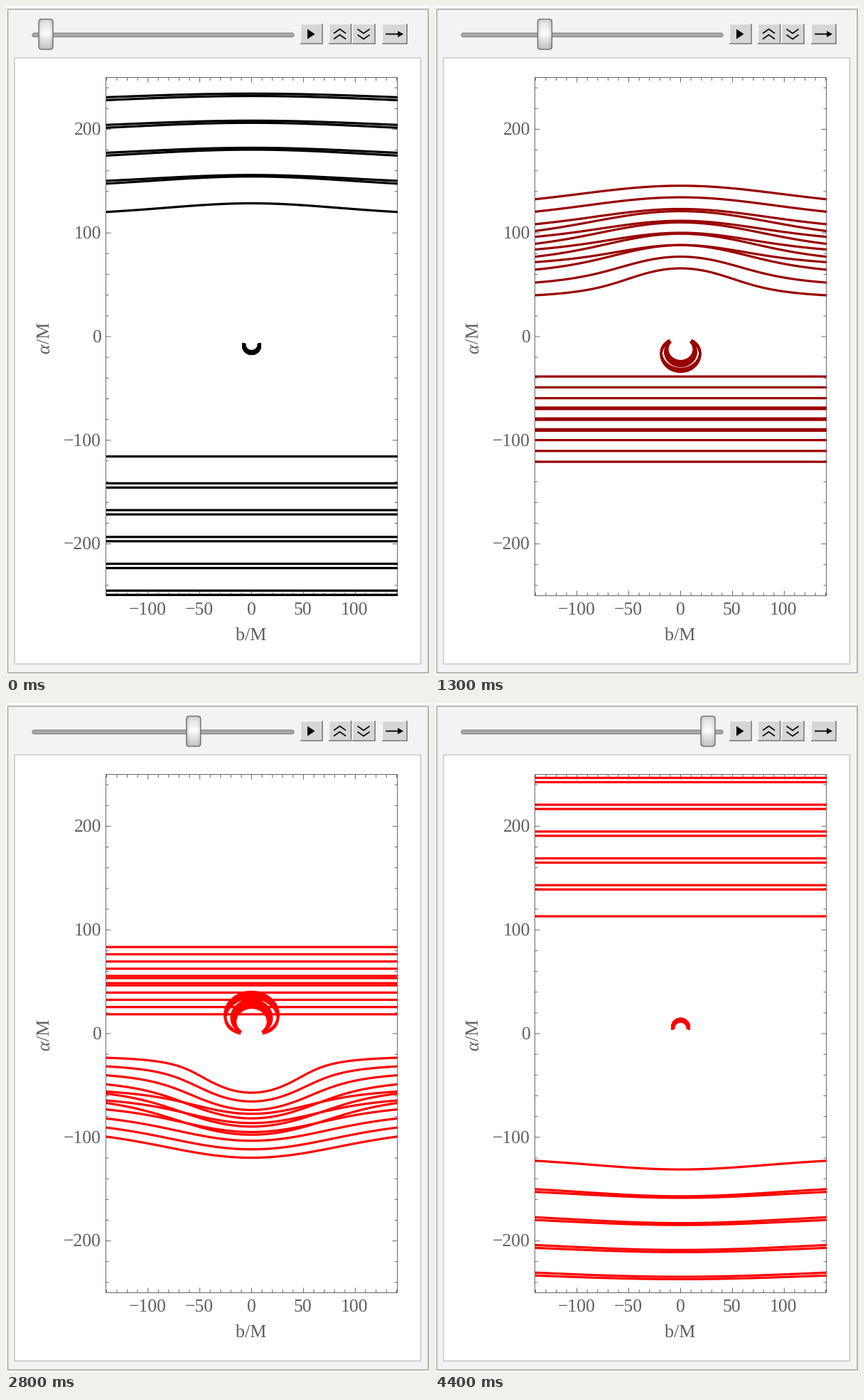
Recreate the animation shown at these times as a matplotlib script. Size 595 by 941 pixels, loop 4.5 s.

```python
import numpy as np
import matplotlib.pyplot as plt
from matplotlib.animation import FuncAnimation
from matplotlib.collections import LineCollection
from matplotlib.patches import FancyBboxPatch, Polygon, Rectangle

plt.rcParams["path.snap"] = False
plt.rcParams["text.hinting"] = "none"

W, H, DPI = 595, 941, 100
PT = 72 / DPI                      # points per pixel
SCALE, CX, CY = 1.458, 345.5, 465  # plot units to pixels
SHIFT = -1.25                      # small vertical offset of the picture
GRAY, INK = "#666666", "#606060"

fig = plt.figure(figsize=(W / DPI, H / DPI), dpi=DPI, facecolor="white")
ax = fig.add_axes([0, 0, 1, 1])
ax.axis("off")


def px(x, y):
    return CX + SCALE * x, CY - SCALE * y


def box(x0, y0, x1, y1, fc="none", ec="none", lw=1.0, z=1):
    ax.add_patch(Rectangle((x0, y0), x1 - x0, y1 - y0, fc=fc, ec=ec,
                           lw=lw * PT, zorder=z))


def stroke(xs, ys, color, lw=1.0, z=2):
    ax.plot(xs, ys, color=color, lw=lw * PT, zorder=z,
            solid_capstyle="butt", solid_joinstyle="miter")


def rounded(x0, y0, x1, y1, r, **style):
    patch = FancyBboxPatch((x0, y0), x1 - x0, y1 - y0,
                           boxstyle=f"round,pad=0,rounding_size={r}", **style)
    return ax.add_patch(patch)


def label(x, y, s, ha="center", rot=0, style="normal", size=25.6):
    ax.text(x, y, s, ha=ha, va="baseline", rotation=rot,
            rotation_mode="anchor", color=INK, family="Liberation Serif",
            style=style, fontsize=size * PT)


def button(x0, x1):
    box(x0, 25, x1, 53.5, fc="#d6d6d6")
    stroke([x0 + 0.5, x0 + 0.5, x1], [53, 25.5, 25.5], "#f8f8f8", 1.2)
    stroke([x0, x1 - 0.5, x1 - 0.5], [53, 53, 25], "#777777", 1.5)


def draw_panel():
    box(2.5, 4.5, 594, 938, fc="#f3f3f3", ec="#a6a6a6", lw=1.6)
    box(12, 73, 583.5, 925.5, fc="white", ec="#bdbdbd", lw=1.2)
    rounded(37, 38, 405, 43.5, 2.7, fc="#a8a8a8", ec="#7c7c7c",
            lw=PT, zorder=2)
    for x0, x1 in ((414, 445.5), (454, 486), (487, 519.5), (529, 564.5)):
        button(x0, x1)
    ax.add_patch(Polygon([(424, 32.5), (434.5, 39.5), (424, 46.5)],
                         fc="black", ec="none", zorder=3))
    for dy in (0, 8):
        stroke([461, 469.5, 478], [38.5 + dy, 32.5 + dy, 38.5 + dy],
               "black", 1.7, 3)
        stroke([494.5, 503, 511.5], [32.5 + dy, 38.5 + dy, 32.5 + dy],
               "black", 1.7, 3)
    stroke([534, 556], [39.5, 39.5], "black", 1.8, 3)
    ax.add_patch(Polygon([(551, 35), (559, 39.5), (551, 44)],
                         fc="black", ec="none", zorder=3))


def draw_axes():
    x0, x1, y0, y1 = 140.5, 550.5, 100.5, 829.5
    box(x0, y0, x1, y1, ec=GRAY, z=2)
    for v in range(-140, 141, 10):
        n = 7 if v % 50 == 0 else 4.5
        x = px(v, 0)[0]
        stroke([x, x], [y0, y0 + n], GRAY)
        stroke([x, x], [y1, y1 - n], GRAY)
    for v in range(-240, 241, 20):
        n = 7 if v % 100 == 0 else 4
        y = px(0, v)[1]
        stroke([x0, x0 + n], [y, y], GRAY)
        stroke([x1, x1 - n], [y, y], GRAY)
    for v in range(-200, 201, 100):
        label(134, px(0, v)[1] + 7.6, str(v).replace("-", "\u2212"), "right")
    for v in range(-100, 101, 50):
        label(px(v, 0)[0] - 1, 855.5, str(v).replace("-", "\u2212"))
    label(345, 892, "b/M", size=26)
    label(61, 489, "\u03b1", "left", 90, "italic", 26)
    label(61, 474.5, "/M", "left", 90, size=26)


draw_panel()
draw_axes()

rays = LineCollection([], linewidths=3.2 * PT, zorder=4, capstyle="butt")
ax.add_collection(rays, autolim=False)
rays.set_clip_path(Rectangle((141, 100), 410, 730.5, transform=ax.transData))

KNOB_X, KNOB_W, KNOB_TOP, KNOB_BOTTOM = 46.1, 20, 18.5, 61
knob = rounded(KNOB_X, KNOB_TOP, KNOB_X + KNOB_W, KNOB_BOTTOM, 4,
               fc="none", ec="#707070", lw=1.4 * PT, zorder=7)
shade = np.interp(np.linspace(0, 1, 64), [0, 0.15, 0.5, 0.6, 1],
                  [0.80, 0.90, 0.99, 0.93, 0.76])[:, None]
side = np.interp(np.linspace(0, 1, 24), [0, 0.25, 0.75, 1],
                 [0.88, 1, 1, 0.88])[None, :]
sheen = ax.imshow(shade * side, cmap="gray", vmin=0, vmax=1, aspect="auto",
                  extent=(KNOB_X, KNOB_X + KNOB_W, KNOB_BOTTOM, KNOB_TOP),
                  zorder=6)
sheen.set_clip_path(knob)

ax.set_xlim(0, W)
ax.set_ylim(H, 0)

U = np.linspace(-1, 1, 401) ** 3


def path(x, y):
    return np.column_stack(px(x, y + SHIFT))


def line_set(tilt):
    """Straight lines before the lens, both lensed images of those behind."""
    step = 100 * np.cos(np.radians(tilt))
    wide = np.array([-300.0, 300.0])
    out = []
    for k in range(5, 11):
        for h in (-15, 15):
            out.append(path(wide, np.full(2, -k * step + h)))
            y = k * step + h
            x = 35 * k * U
            root = np.sqrt(1 + 1600 * k / (x * x + y * y))
            for f in ((1 + root) / 2, (1 - root) / 2):
                out.append(path(x * f, y * f))
    return out


def update(n):
    m = (34 * n + 27) // 50        # 31 slider positions in 45 ticks
    rays.set_segments(line_set(75 + m))
    rays.set_color((min(1, m / 15), 0, 0))
    x = KNOB_X + 10.93 * m
    knob.set_x(x)
    sheen.set_extent((x, x + KNOB_W, KNOB_BOTTOM, KNOB_TOP))
    ax.set_xlim(0, W)
    ax.set_ylim(H, 0)
    return rays, sheen, knob


anim = FuncAnimation(fig, update, frames=45, interval=100, repeat=True,
                     repeat_delay=0, blit=False)
plt.show()
```
